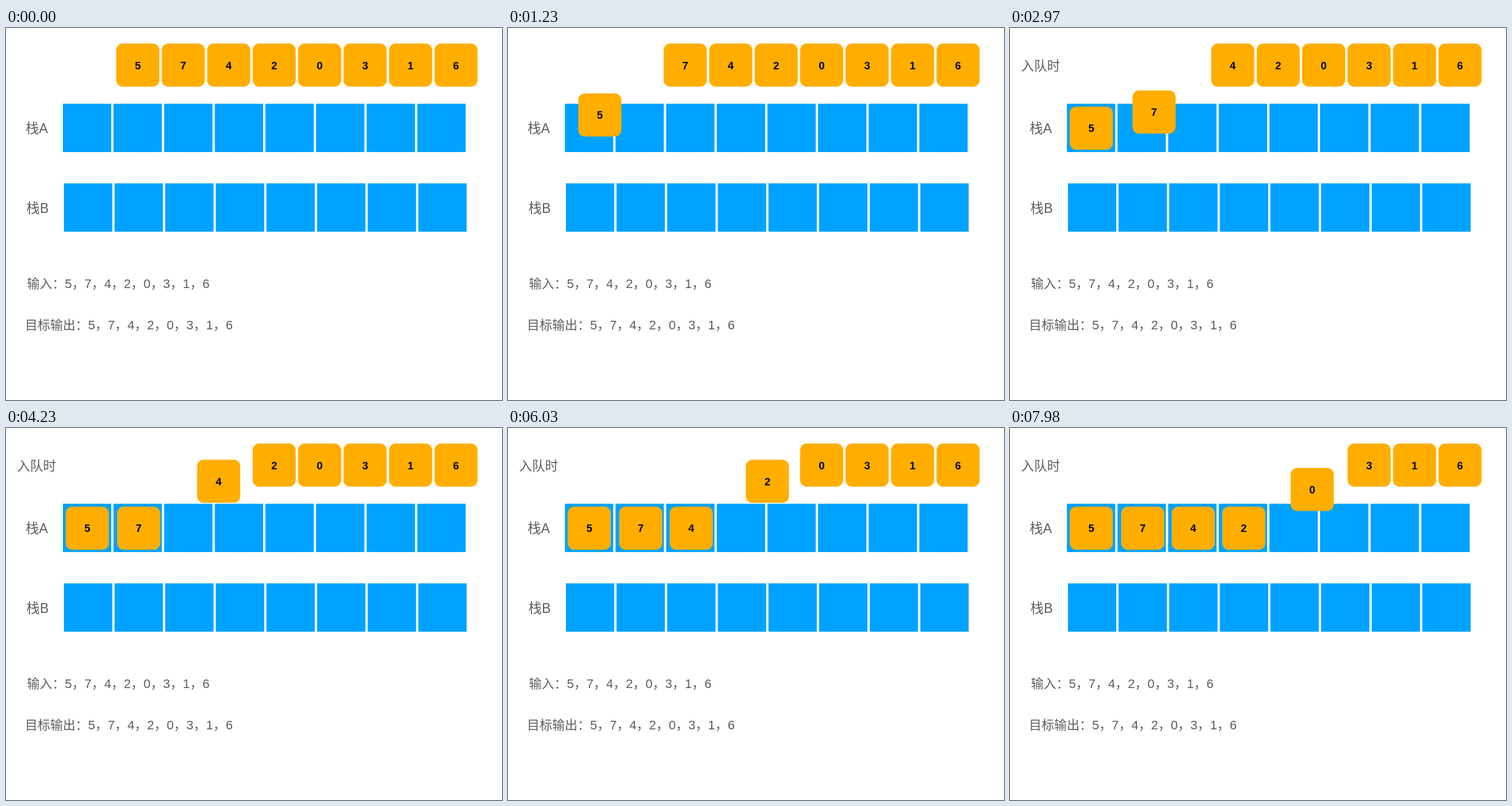
An HTML page with a canvas that plays this animation: 864 px wide and 648 px high, repeating every 8000 ms.

```html
<!DOCTYPE html>
<html lang="zh-CN">
<head>
<meta charset="utf-8">
<title>Stack queue</title>
<style>
html, body { margin: 0; width: 100%; height: 100%; overflow: hidden; background: #fff; }
canvas { display: block; }
</style>
</head>
<body>
<canvas id="stage" width="864" height="648"></canvas>
<script>
const ctx = document.getElementById('stage').getContext('2d');
const LOOP = 8000, STEP = 30, MOVE = 1800;
const FONT = '"Liberation Sans", "Noto Sans CJK SC", "Noto Sans CJK JP", sans-serif';

// Full-width punctuation
const COMMA = '\uff0c', COLON = '\uff1a';

const digits = [5, 7, 4, 2, 0, 3, 1, 6];
const list = COLON + digits.join(COMMA);
const slots = [104, 193.6, 281.6, 369.6, 457.2];
const TILE = 75.1, QUEUE_Y = 27.1, STACK_Y = 136.9;

const clamp = v => Math.min(1, Math.max(0, v));

// cubic-bezier(.42, 0, .58, 1)
function ease(p) {
  if (p <= 0 || p >= 1) return clamp(p);
  let lo = 0, hi = 1, u = 0.5;
  for (let i = 0; i < 24; i++) {
    u = (lo + hi) / 2;
    const x = 3 * (1 - u) * (1 - u) * u * 0.42 + 3 * (1 - u) * u * u * 0.58 + u * u * u;
    if (x < p) lo = u; else hi = u;
  }
  return u * u * (3 - 2 * u);
}

function label(str, x, y, size) {
  ctx.fillStyle = '#5e5e5e';
  ctx.textAlign = 'left';
  ctx.font = `${size}px ${FONT}`;
  ctx.fillText(str, x, y);
}

function row(x, y) {
  ctx.fillStyle = '#00a2ff';
  for (let i = 0; i < 8; i++) ctx.fillRect(x + i * 88.2, y, 84.2, 84.2);
}

function tile(n, x, y) {
  ctx.fillStyle = '#ffae00';
  ctx.beginPath();
  ctx.roundRect(x, y, TILE, TILE, 11.5);
  ctx.fill();
  ctx.fillStyle = '#000';
  ctx.textAlign = 'center';
  ctx.font = `bold 18.6px ${FONT}`;
  ctx.fillText(n, x + TILE / 2, y + 44.5);
}

function draw(t) {
  ctx.fillStyle = '#fff';
  ctx.fillRect(0, 0, 864, 648);

  row(99.1, 131.9);
  row(100.9, 270.6);
  label('栈A', 34.2, 183, 23.3);
  label('栈B', 35.6, 322, 23.3);
  label('输入' + list, 36.5, 452.5, 22);
  label('目标输出' + list, 33, 524.8, 22);

  ctx.globalAlpha = ease(clamp((t - 1200) / 600));
  label('入队时', 19.2, 74, 22.7);
  ctx.globalAlpha = 1;

  digits.forEach((n, i) => {
    const p = ease(clamp(t / MOVE - i));
    const x = 192 + i * 79.2;
    const end = slots[i] ?? x;
    tile(n, x + (end - x) * p, QUEUE_Y + (STACK_Y - QUEUE_Y) * p);
  });
}

const start = performance.now();
function loop() {
  const t = (performance.now() - start) % LOOP;
  draw(Math.floor(t / STEP) * STEP);
  requestAnimationFrame(loop);
}
draw(0);
requestAnimationFrame(loop);
</script>
</body>
</html>
```
